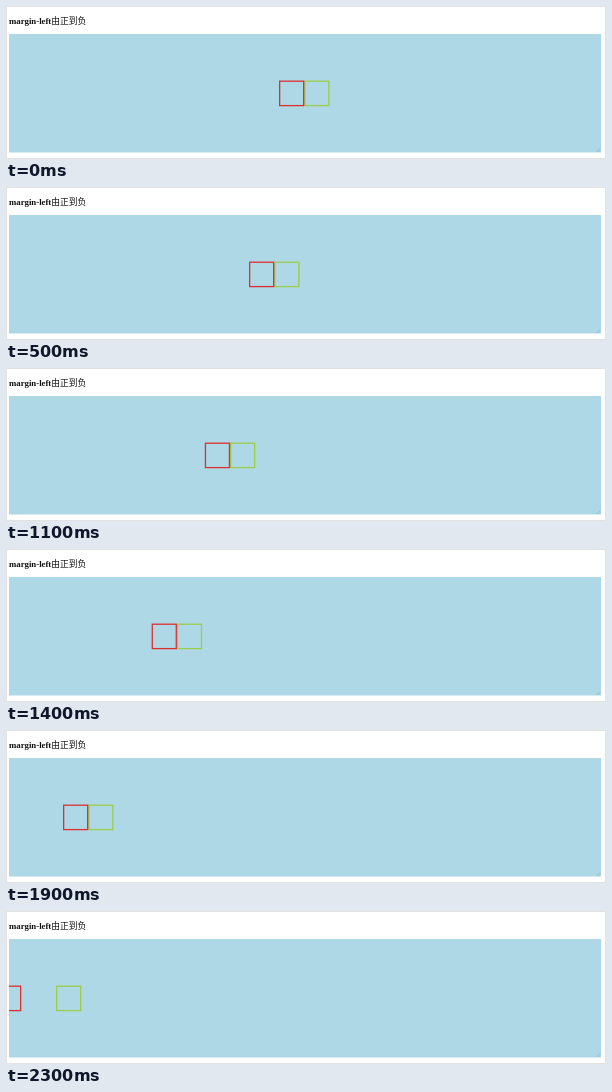
Animation of 600x153 px, one loop 2400 ms. Source, as an HTML page:

```html
<!DOCTYPE html>
<html lang="zh">
<head>
<meta charset="utf-8">
<title>margin-left</title>
<style>
  html, body { margin: 0; width: 100%; height: 100%; overflow: hidden; background: #fff; }
  svg { display: block; }
  .title { font: bold 8.75px "Liberation Serif", "Noto Sans CJK SC", "Noto Sans CJK", serif; fill: #111; }
  .title .cjk { font-weight: 400; }
  .box { fill: none; stroke-width: 1.3; }
</style>
</head>
<body>
<svg width="600" height="153" viewBox="0 0 600 153">
  <defs>
    <clipPath id="panel"><rect x="3" y="28" width="592" height="118.5"/></clipPath>
  </defs>
  <rect x=".5" y=".5" width="599" height="152" fill="#fff" stroke="#e2e2e2"/>
  <text class="title" x="3" y="17.5">margin-left<tspan class="cjk" dy=".3">由正到负</tspan></text>
  <g clip-path="url(#panel)">
    <rect x="3" y="28" width="592" height="119" fill="#afd8e7"/>
    <path d="M590.5 146 l3.5 -3.5 M592.7 146 l1.3 -1.3" stroke="#8aa5af" stroke-width=".6"/>
    <rect class="box" id="green" x=".65" y="75.2" width="24" height="24.4" stroke="#9acd4a"/>
    <rect class="box" id="red" x=".65" y="75.2" width="24" height="24.4" stroke="#dc3030"/>
  </g>
</svg>
<script>
  const LOOP = 2400, TICK = 100, SIDE = 25.2, GREEN_MIN = 50;
  const red = document.getElementById("red");
  const green = document.getElementById("green");

  // key points of the drag: [time in ms, left edge of the red box]
  const keys = [[200, 273], [500, 243], [600, 243], [700, 235], [800, 235], [1100, 198.8], [1900, 57], [2300, -10]];

  function leftAt(t) {
    const next = keys.findIndex(([time]) => time >= t);
    if (next === 0) return keys[0][1];
    const [t0, x0] = keys[next - 1], [t1, x1] = keys[next];
    return x0 + (x1 - x0) * (t - t0) / (t1 - t0);
  }

  const moveTo = (box, x) => box.setAttribute("transform", `translate(${x} 0)`);

  function draw() {
    const t = performance.now() % LOOP;
    const x = leftAt(Math.floor(t / TICK) * TICK);
    moveTo(red, x);
    // the green box follows until the red margin turns negative
    moveTo(green, Math.max(GREEN_MIN, x + SIDE));
    requestAnimationFrame(draw);
  }
  draw();
</script>
</body>
</html>
```
